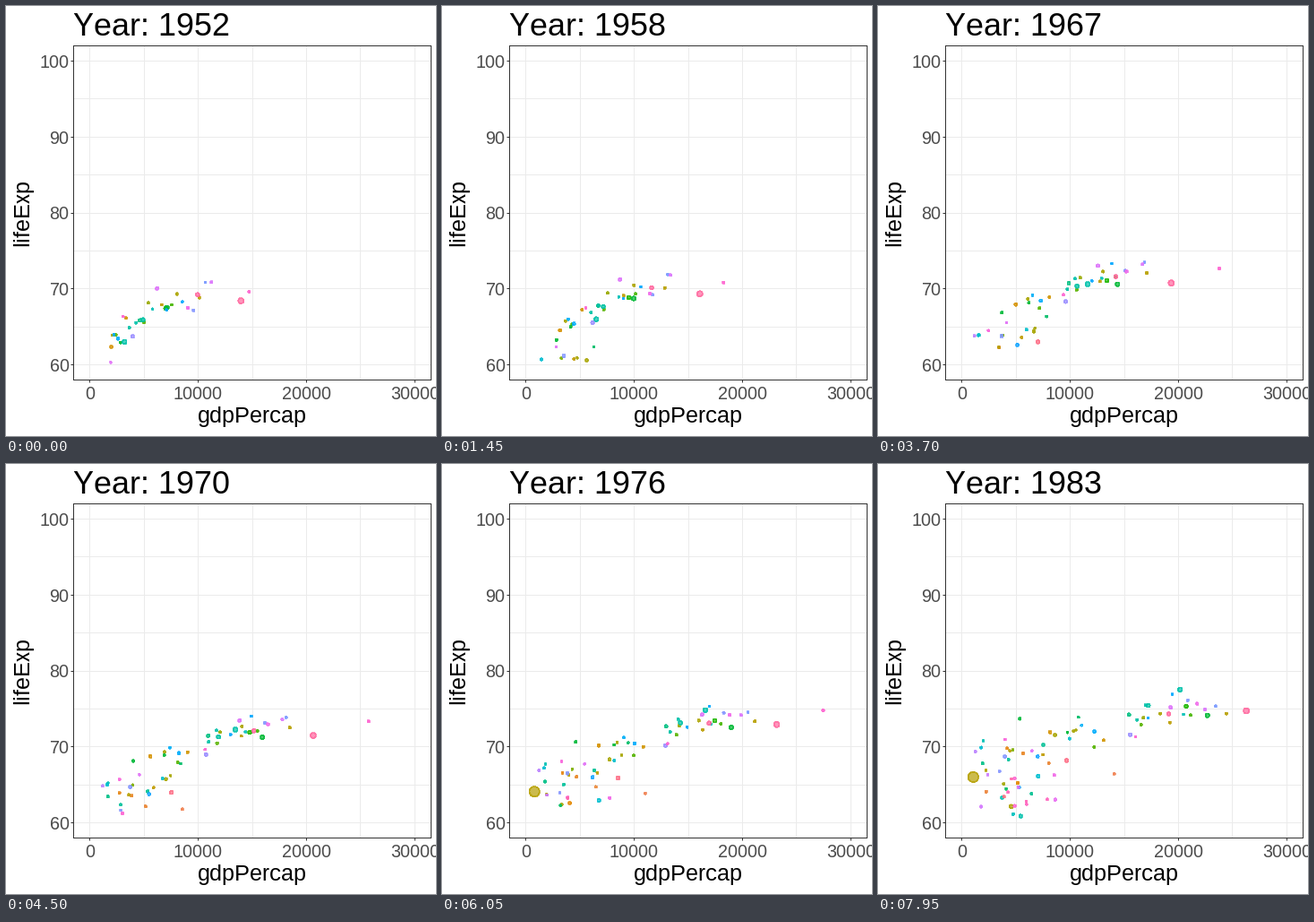
A matplotlib script that plays this animation: 480 px wide and 480 px high, repeating every 8 s.

```python
import numpy as np
import matplotlib.pyplot as plt
from matplotlib.animation import FuncAnimation

plt.rcParams["font.family"] = "Liberation Sans"
plt.rcParams["text.hinting"] = "default"
plt.rcParams["text.hinting_factor"] = 1
plt.rcParams["text.kerning_factor"] = 6

SIZE, DPI = 480, 72
FRAMES, INTERVAL = 160, 50
YEARS_PER_FRAME = 55 / 279
START, END = 1952, 1983.34
GREY_TEXT, GREY_LINE, GREY_GRID = "#4D4D4D", "#333333", "#EBEBEB"


def hue_color(turn):
    """Hue at luminance 65 and chroma 100 (CIE LUV), turn from 0 to 1."""
    lum, chroma = 65, 100
    h = np.radians(15 + 360 * turn)
    y = ((lum + 16) / 116) ** 3
    u = chroma * np.cos(h) / (13 * lum) + 0.1978
    v = chroma * np.sin(h) / (13 * lum) + 0.4683
    x = 9 * y * u / (4 * v)
    z = y * (12 - 3 * u - 20 * v) / (4 * v)
    linear = np.clip([3.2405 * x - 1.5371 * y - 0.4985 * z,
                      -0.9693 * x + 1.8760 * y + 0.0416 * z,
                      0.0556 * x - 0.2040 * y + 1.0572 * z], 0, 1)
    return np.where(linear <= 0.0031308, 12.92 * linear,
                    1.055 * linear ** (1 / 2.4) - 0.055)


class Dot:
    """A country moving through (year, gdp, life) points, shown between them."""

    def __init__(self, turn, pop, *path):
        self.turn = turn
        self.area = (1.6 + 0.32 * np.sqrt(pop)) ** 2
        self.color = (*hue_color(turn), 0.7)
        self.years, self.gdp, self.life = zip(*path)

    def visible(self, year):
        return self.years[0] <= year <= self.years[-1] + 0.01

    def at(self, year):
        return (np.interp(year, self.years, self.gdp),
                np.interp(year, self.years, self.life))


def leading_dots():
    """The few large or outlying dots that the eye follows."""
    return [
        Dot(0.94, 195, (START, 13990, 68.4), (1967, 19530, 70.8),
            (END, 26316, 74.7)),
        Dot(0.46, 100, (START, 3217, 63), (1972, 14780, 73.4),
            (END, 20186, 77.5)),
        Dot(0.17, 930, (1972, 677, 63.1), (END, 1074, 66)),
        Dot(0.94, 55, (START, 9980, 69.2), (END, 19152, 74.3)),
        Dot(0.31, 52, (START, 7030, 67.4), (END, 20768, 75.3)),
        Dot(0.33, 77, (START, 7144, 67.5), (END, 22730, 74.1)),
        Dot(0.45, 54, (START, 4932, 65.9), (END, 17253, 75.4)),
        Dot(0.87, 6, (START, 14734, 69.6), (1972, 27195, 73.8),
            (1982, 28000, 76.3)),
    ]


def early_dots(rng, count=27):
    """Countries on the plot from the start, ordered by wealth."""
    dots = []
    for wealth in np.linspace(0, 1, count):
        gdp = 1950 + 9300 * wealth ** 1.6
        life = 62.3 + 7.5 * wealth + rng.normal(0, 1.3)
        gdp_end = 8500 + 15000 * wealth ** 0.8 + rng.normal(0, 1500)
        life_end = 70.8 + 5 * wealth + rng.normal(0, 1)
        half = (1967, (gdp + gdp_end) / 2, 0.4 * life + 0.6 * life_end)
        dots.append(Dot(rng.random(), rng.lognormal(1.8, 0.8),
                        (START, gdp, max(life, 60.3)), half,
                        (END, gdp_end, life_end)))
    return dots


def later_dots(rng, per_step=8):
    """Countries that rise past a life expectancy of 60, every five years."""
    dots = []
    for entry in range(1957, 1983, 5):
        for _ in range(per_step):
            span = END - entry
            gdp = rng.lognormal(np.log(3900), 0.5)
            life = rng.uniform(60.2, 63)
            dots.append(Dot(rng.random(), rng.lognormal(2, 1),
                            (entry, gdp, life),
                            (END, gdp * (1 + span * rng.uniform(0, 0.055)),
                             life + span * rng.uniform(0.28, 0.46))))
    return dots


rng = np.random.default_rng(8)
everyone = leading_dots() + early_dots(rng) + later_dots(rng)
everyone.sort(key=lambda d: d.turn)

fig = plt.figure(figsize=(SIZE / DPI, SIZE / DPI), dpi=DPI, facecolor="white")
left, right, top, bottom = 75.3, 473.7, 43.7, 417.4
ax = fig.add_axes([left / SIZE, 1 - bottom / SIZE,
                   (right - left) / SIZE, (bottom - top) / SIZE])
ax.set_xlim(-1500, 31500)
ax.set_ylim(58, 102)
ax.set_xticks(range(0, 30001, 10000))
ax.set_yticks(range(60, 101, 10))
ax.set_xticklabels([])
ax.set_yticklabels([])
ax.set_xticks(range(5000, 30000, 10000), minor=True)
ax.set_yticks(range(65, 100, 10), minor=True)
ax.set_axisbelow(True)
ax.grid(which="both", color=GREY_GRID, lw=1)
ax.tick_params(which="major", length=3.2, width=1, color=GREY_LINE)
ax.tick_params(which="minor", length=0)
for spine in ax.spines.values():
    spine.set(color=GREY_LINE, linewidth=1)


def label(x, y, text, size, color="black", **kw):
    """Text with its baseline at pixel (x, y) from the top left."""
    return fig.text(x / SIZE, 1 - y / SIZE, text, fontsize=size, color=color,
                    va="baseline", **kw)


for i in range(4):
    label(93.4 + 121 * i, 439, str(10000 * i), 20, GREY_TEXT, ha="center")
for i in range(5):
    label(70.5, 407.7 - 84.73 * i, str(60 + 10 * i), 20, GREY_TEXT, ha="right")
label(274.5, 465, "gdpPercap", 25, ha="center")
label(25, 230, "lifeExp", 25, ha="center", rotation=90,
      rotation_mode="anchor")
title = label(75, 33, "", 36)
dots = ax.scatter([], [], linewidths=0.7, zorder=2)
dots.set_antialiased(False)


def draw(frame):
    year = START + frame * YEARS_PER_FRAME
    shown = [d for d in everyone if d.visible(year)]
    dots.set_offsets([d.at(year) for d in shown])
    dots.set_sizes([d.area for d in shown])
    dots.set_facecolor([d.color for d in shown])
    dots.set_edgecolor([d.color for d in shown])
    title.set_text(f"Year: {round(year)}")
    return dots, title


anim = FuncAnimation(fig, draw, frames=FRAMES, interval=INTERVAL,
                     repeat=True, repeat_delay=0)
plt.show()
```
